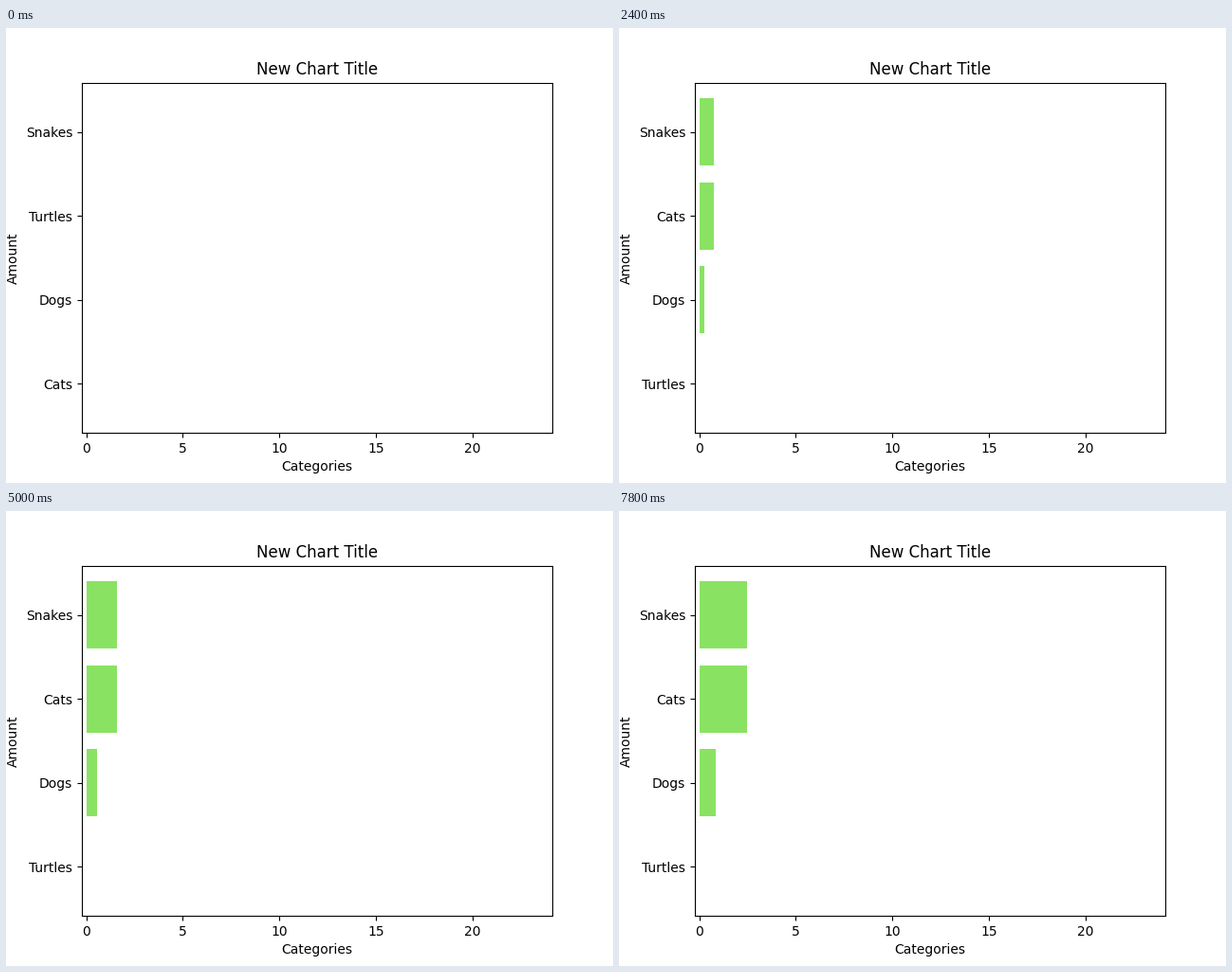
Write a matplotlib script that moves like this. It is 640x480 px and loops after 8 s.

```python
import matplotlib.pyplot as plt
from matplotlib.animation import FuncAnimation

FRAMES = 40
INTERVAL = 200
STEPS = 47
MAX_AMOUNT = 23

# Amount each category gains over one full period
GROWTH = {"Cats": 3, "Dogs": 1, "Turtles": 0, "Snakes": 3}

fig, ax = plt.subplots(figsize=(6.4, 4.8), dpi=100)
ax.set_title("New Chart Title")
ax.set_xlabel("Categories")
ax.set_ylabel("Amount")
ax.set_xlim(-0.01 * MAX_AMOUNT, 1.05 * MAX_AMOUNT)
ax.set_ylim(-0.59, len(GROWTH) - 0.41)
ax.set_xticks(range(0, 21, 5))

rows = range(len(GROWTH))
bars = ax.barh(rows, [0] * len(GROWTH), height=0.8, color="#8ae263")
ax.set_xlim(-0.01 * MAX_AMOUNT, 1.05 * MAX_AMOUNT)
ax.set_ylim(-0.59, len(GROWTH) - 0.41)


def update(frame):
    amounts = {name: gain * frame / STEPS for name, gain in GROWTH.items()}
    # Stable sort keeps tied categories in their listed order
    ranked = sorted(amounts, key=amounts.get)
    ax.set_yticks(rows, ranked)
    for bar, name in zip(bars, ranked):
        bar.set_width(amounts[name])
    return list(bars)


anim = FuncAnimation(fig, update, frames=FRAMES, interval=INTERVAL,
                     init_func=lambda: update(0), repeat=True,
                     repeat_delay=0, blit=False)
plt.show()
```
